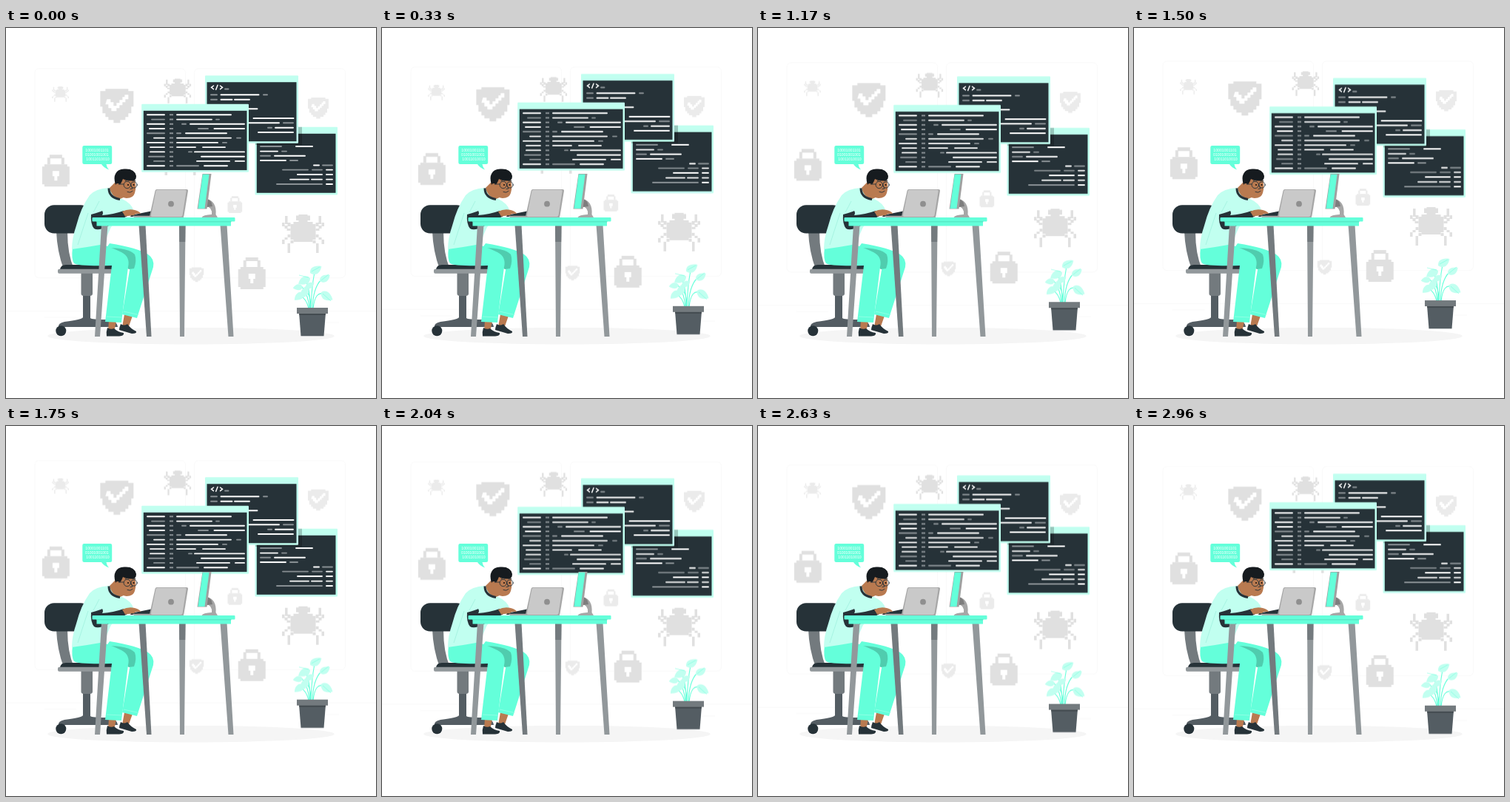
Write an HTML page without scripts that moves like this. It is 500 by 500 pixels and loops after 3000 ms.

```html
<!DOCTYPE html>
<html lang="en">
<head>
<meta charset="utf-8">
<title>Coder at a desk</title>
<style>
  html, body { margin: 0; width: 100%; height: 100%; overflow: hidden; background: #fff; }
  svg { display: block; width: 100%; height: 100%; }
  .float { animation: float 3s linear infinite; }
  .code { animation: code 3s linear -1s infinite; }
  @keyframes float { 50% { transform: translateY(-10px); } }
  @keyframes code {
    0%, 100% { transform: translateY(6.67px); }
    50% { transform: translateY(-3.33px); }
  }
  .faint { fill: none; stroke: #ebebeb; stroke-width: .3; }
  .icon { fill: #e0e0e0; }
  .pale { fill: #ebebeb; }
  .hole { fill: #fff; }
  .mint { fill: #64ffda; }
  .light { fill: #c1fff0; }
  .dark { fill: #263238; }
  .g1 { fill: #545d63; }
  .g2 { fill: #737a7e; }
  .g3 { fill: #92989b; }
  .skin { fill: #b97a50; }
  .w, .g { fill: none; stroke: #fff; stroke-width: 1.9; stroke-linecap: round; }
  .g { stroke: #8a9195; }
  .stem { fill: none; stroke: #64ffda; stroke-width: 1.1; }
  .ink { fill: none; stroke: #263238; stroke-width: .9; stroke-linecap: round; }
  text { font: 5.2px "Liberation Sans", Arial, sans-serif; fill: #fff; }
</style>
</head>
<body>
<svg viewBox="0 0 500 500">
  <defs>
    <g id="shield">
      <path d="M7 0H38V3H45V24H42V33H38V38H34V42H27V46H18V42H11V38H7V33H3V24H0V3H7Z"/>
      <path class="hole" d="M9 14h5v4h4v5h4v-4h4v-4h4v-4h3v-3h5v6h-4v4h-4v4h-4v4h-4v4h-7v-4h-4v-5h-4Z"/>
    </g>
    <g id="lock">
      <path d="M7 13V4h3V0H27V4h3V13H26V5H11V13Z"/>
      <path d="M3 13H34V16H37V40H34V43H3V40H0V16H3Z"/>
      <path class="hole" d="M14 22h9v7h-2.500v6h-4v-6h-2.500Z"/>
    </g>
    <path id="legs" d="M-24.500 2h3.500v9h4v5h-4v-3h-3.500ZM-28.500 11h3.500v5h-3.500ZM-25 15h4v4h4v3h-5v-3h-3ZM-21 27h4v4h-4v3h-4v-3h4ZM-28.500 34h3.500v6h-3.500ZM-17 35h4v4h-4.500v13h-3.500V39h4Z"/>
    <g id="bug">
      <path d="M-6 0H6V1.500H9.500V8H6V10H13V13H17V34H13V37H-13V34H-17V13H-13V10H-6V8H-9.500V1.500H-6Z"/>
      <use href="#legs"/>
      <use href="#legs" transform="scale(-1 1)"/>
    </g>
    <path id="leaf" d="M0 0C1 -7 8 -9 17 -5C14 3 6 7 0 0Z"/>
  </defs>

  <!-- backdrop -->
  <g class="float">
    <rect class="faint" x="39" y="54.800" width="203.500" height="282.800" rx="5.500"/>
    <rect class="faint" x="254.500" y="54.800" width="204" height="282.800" rx="5.500"/>
    <path class="faint" d="M0 382.500H500M52 391h43M104 391h7M396 389h19M417 398h33"/>
    <g class="icon">
      <use href="#shield" x="127.300" y="82.300"/>
      <use href="#lock" x="48.800" y="171.300"/>
      <use href="#lock" x="313.700" y="310"/>
      <use href="#bug" x="401.500" y="252"/>
      <use href="#bug" x="235.500" y="147"/>
      <use href="#bug" transform="translate(231.800 68.500) scale(.64)"/>
    </g>
    <g class="pale">
      <use href="#bug" transform="translate(73.500 79) scale(.4)"/>
      <use href="#shield" transform="translate(408 94) scale(.62)"/>
      <use href="#shield" transform="translate(247.800 323.500) scale(.43)"/>
      <use href="#lock" transform="translate(299.500 227.300) scale(.53)"/>
    </g>
  </g>

  <ellipse cx="250" cy="416.200" rx="193.900" ry="11.300" fill="#f5f5f5"/>

  <!-- plant -->
  <g class="float">
    <path class="stem" d="M412 379Q413 350 417 330M411 379Q411 350 403 337M414 379Q415 351 426 340M410 379Q408 357 398 348M409 379Q406 366 398 362M415 379Q418 354 430 360M412 379Q412 366 408 358"/>
    <g class="light">
      <use href="#leaf" transform="translate(411 331) rotate(-14)"/>
      <use href="#leaf" transform="translate(411 338) rotate(170)"/>
      <use href="#leaf" transform="translate(424 342) rotate(-15) scale(.9)"/>
      <use href="#leaf" transform="translate(401 350) rotate(190) scale(.75)"/>
      <use href="#leaf" transform="translate(403 358) rotate(160) scale(.92)"/>
      <use href="#leaf" transform="translate(426 357) rotate(50) scale(1.050)"/>
      <use href="#leaf" transform="translate(401 364) rotate(-55) scale(.95)"/>
      <use href="#leaf" transform="translate(405 351) rotate(-15) scale(.75)"/>
    </g>
    <path class="stem" d="M413 329l11 -6M409 337l-13 -3M426 341l10 -8M428 359l11 10" style="stroke-width:.5"/>
    <path class="g1" d="M396 385H432L429.500 416.300H398.500Z"/>
    <path d="M396 385H432L431.700 388H396.300Z" fill="#434b50"/>
    <rect class="g2" x="393" y="378" width="42" height="8"/>
  </g>

  <!-- code windows -->
  <g class="code">
    <g>
      <rect class="light" x="336.500" y="133.700" width="111.500" height="91.800" rx="1"/>
      <rect class="dark" x="338.800" y="142.800" width="106.700" height="80"/>
      <path d="M337 133.700H400V158H337Z" opacity=".22"/>
      <path class="g" d="M344 160h28M373 166.600h6M344 172.800h13M384 179h10M428 185.500h13M374 191.600h34M414 191.600h13M366 211h61"/>
      <path class="w" d="M392 160h22M344 166.600h23M363 172.800h41M344 179h34M416 185.500h7M433 191.600h8M394 198h33M433 198h8M384 204.600h25M413 204.600h14M433 204.600h8M433 211h8"/>
    </g>
    <g>
      <rect class="light" x="269" y="64.200" width="126" height="91.500" rx="1"/>
      <rect class="dark" x="271.500" y="73.200" width="121" height="80"/>
      <path class="w" style="stroke-width:1.500" d="M280.500 78l-3 2.300 3 2.300M289.500 78l3 2.300 -3 2.300M286 77.300l-2.300 6"/>
      <path class="g" d="M296 82.500h4.500M277 90.300h8M348 90.300h5M277 96.700h8M375 128.300h13M354 134.700h5"/>
      <path class="w" d="M290.500 90.300h51M290.500 96.700h15M309 96.700h20M290.500 109.300h49M334.500 122h54M300 128.300h69M364 134.700h24M341 141h47"/>
    </g>
    <g>
      <rect class="light" x="183.200" y="102.800" width="144.800" height="92" rx="1"/>
      <rect class="dark" x="185.800" y="111.800" width="139.700" height="80.300"/>
      <path class="w" d="M191 117.300h23M191 129.800h23M194 136h20M200 148.600h14M191 154.900h23M195 161.100h19M195 167.400h19M191 186.200h23"/>
      <path class="g" d="M197 123.600h17M191 142.300h23M193 173.700h21M200 179.900h14"/>
      <path class="g" d="M223.500 116.300V188" style="stroke-width:5;stroke-linecap:butt;stroke-dasharray:2 4.260"/>
      <path class="w" d="M231 117.300h73M231 123.600h47M249 129.800h73M281.500 136h40.500M243 142.300h55M231 148.600h73M231 154.900h55M231 161.100h25M266 161.100h30M255 167.400h67M264 173.700h58M258 179.900h44M310 179.900h12M268 186.200h31"/>
      <path class="g" d="M284 123.600h4M238 129.800h5M260 136h13M231 142.300h5M312 148.600h5M293 154.900h5M247 167.400h4M231 186.200h29"/>
    </g>
  </g>

  <!-- speech bubble -->
  <path class="mint" d="M105.500 159H141a2.200 2.200 0 0 1 2.200 2.200V181.800a2.200 2.200 0 0 1 -2.200 2.200H135.500Q136 188 139 191.500Q132 189 129 184H105.500a2.200 2.200 0 0 1 -2.200 -2.200V161.200a2.200 2.200 0 0 1 2.200 -2.200Z"/>
  <text x="107.300" y="167.300">10001001101</text>
  <text x="107" y="173.300">01001001001</text>
  <text x="108.300" y="179.300">10011010010</text>

  <!-- chair -->
  <path class="g2" d="M68 275H83Q83 306 92 326H78Q69 302 68 275Z"/>
  <rect class="dark" x="52" y="239.300" width="62" height="38.300" rx="13"/>
  <path class="dark" d="M73 326Q74 320 81 320H143V326Z"/>
  <path class="g1" d="M104 360H114V392Q116 394 136 394Q150 395 151 404H71Q70 399 79 397Q103 394 104 391Z"/>
  <path class="g2" d="M101.500 331H117V359Q117 362 113 362H105.500Q101.500 362 101.500 359Z"/>
  <rect class="g3" x="70" y="325.700" width="74" height="6" rx="2"/>
  <circle class="dark" cx="74.300" cy="409.300" r="7"/>

  <!-- man -->
  <g>
    <path class="skin" d="M160 387l-3 17 8 2 6 -17ZM139 395l-1 15 8 1 3 -15Z"/>
    <path class="dark" d="M155 400Q153 405 153 408L170 413Q177 413 176 410Q168 406 164 400Q160 403 155 400ZM137 405Q135 411 136 416.500H153Q160 416 159 412Q151 411 146 406Q141 408 137 405Z"/>
    <path class="mint" d="M140 291Q178 297 192 306Q201 312 199 323L177 392L157 387L168 321L130 305Z"/>
    <path d="M135 297Q166 297 174 306Q177 314 173 325L166 326L140 306Z" fill="#50ccae"/>
    <path class="mint" d="M90 296Q88 313 92 318Q97 322 143 321L134 397L156 398L165 323Q168 309 156 303Q146 298 126 291Z"/>
    <path d="M159 383L179 387.500M136 390L157 391" fill="none" stroke="#8dffe4" stroke-width="1"/>

    <path class="light" d="M139 216Q121 217 113 226Q101 243 95 267Q89 284 89 299Q111 296 133 292Q140 268 152 255L172 246Q170 237 155 230Z"/>
    <path class="skin" d="M148 208L140 216Q142 228 154 231L159 229Z"/>
    <path d="M139 216.500Q139 229 154 231.500" fill="none" stroke="#263238" stroke-width="3"/>
    <path class="skin" d="M148 210Q150 202 160 201H173Q177 214 174 223Q172 230 163 230Q151 229 148 210Z"/>
    <path d="M148 212Q145 202 148 197Q151 190 161 190.500Q174 190 176 200Q176 206 171 206.500Q163 207 158 204Q155 212 151 214Z" fill="#161b1f"/>
    <ellipse class="skin" cx="151" cy="214" rx="3.200" ry="4"/>
    <g class="ink">
      <circle cx="163.800" cy="212" r="4.700"/>
      <circle cx="173" cy="212" r="4.100"/>
      <path d="M152 211L159 211M161 206.500q3 -2 5 -.5M171 206.500q2 -1 4 0M164 221.500q4 2 7 -1M169 213l2 4 -3 .5"/>
    </g>
    <circle cx="165" cy="212" r=".9"/><circle cx="172.500" cy="212" r=".9"/>

    <path class="dark" d="M169 253L196 247.500V255H168Z"/>
    <path class="dark" d="M115 252Q129 248 130 247Q132 250 130 253Q145 252 159 247L164 254L139 267Q125 275 119 271Q114 265 115 252Z"/>
    <path class="skin" d="M157 248Q165 244 174 246Q181 248 182 251Q175 250 173 253L161 254.500Z"/>
    <path d="M126 234Q122 242 118 249M111 250Q104 271 97 293" fill="none" stroke="#9beedb" stroke-width=".7"/>
  </g>

  <!-- desk -->
  <path class="g2" d="M179.500 266H188.500L196.500 417H190Z"/>
  <path class="g3" d="M129 266H137.500L127 417H120ZM234 266H242.500L241 417H235ZM289.500 266H298.500L307.500 417H300.500Z"/>
  <path class="g2" d="M234 266H242.500L242.200 289H234.300Z"/>
  <rect class="mint" x="122.500" y="260" width="181.500" height="7.500"/>
  <path d="M122 261.700H304.500" stroke="#46c9aa"/>
  <rect class="mint" x="116.500" y="256" width="193" height="5.500" rx="1"/>

  <!-- laptop -->
  <path d="M171 253.800H240V256H173Z" fill="#a6a6a6"/>
  <path d="M204 218H244Q246.300 218 246 220L240.500 253.500Q240 256 237.500 256H196Q193.700 256 194.200 253.500L201.500 220Q202 218 204 218Z" fill="#a6a6a6"/>
  <path d="M204.500 218.700H242Q244 218.700 243.600 220.500L238.500 253Q238 255 236 255H197.500Q195.500 255 196 253L202.500 220.500Q203 218.700 204.500 218.700Z" fill="#c9c9c9"/>
  <circle cx="223" cy="237.700" r="3.900" fill="#8f8f8f"/>

  <!-- monitor -->
  <path d="M272 231Q285 235 283.500 252L286 256H264.500Q266 252.500 278 252Q279 242 270 241Z" fill="#a6a6a6"/>
  <path d="M272 231Q278 233 279 241L271 242Z" fill="#7d7d7d"/>
  <path d="M265.500 197H277.500L271.500 244.500H258.500Z" fill="#a0a0a0"/>
  <path class="mint" d="M265.800 197.700H274.500L268.500 244H259.500Z"/>
</svg>
</body>
</html>
```
